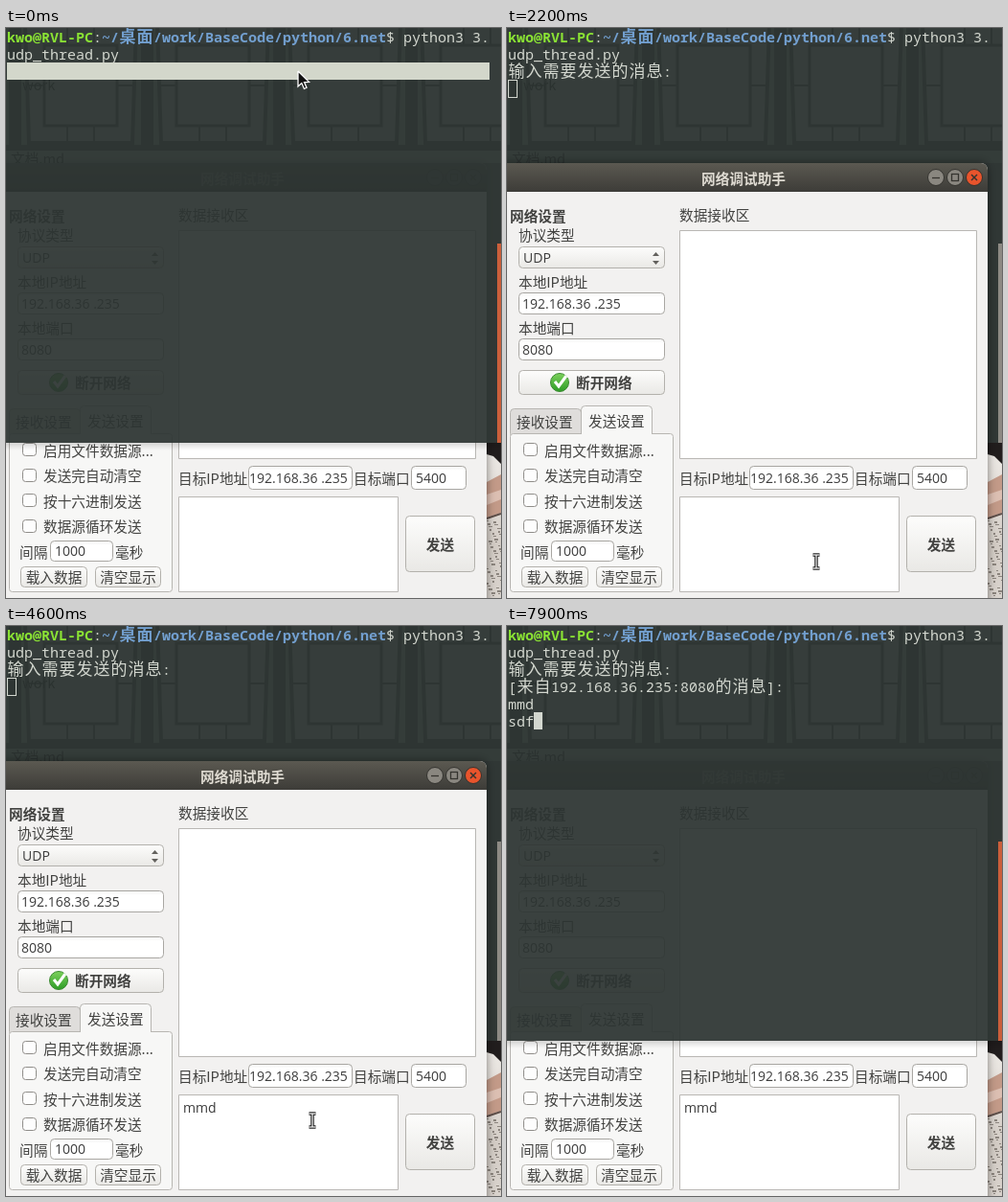
Animation, 517 px wide and 595 px high, one loop 8000 ms. Source, as an HTML page with a canvas:

```html
<!DOCTYPE html>
<html lang="zh">
<head>
<meta charset="utf-8">
<style>
html, body { margin: 0; width: 517px; height: 595px; overflow: hidden; background: #333a39 }
canvas { display: block }
</style>
</head>
<body>
<canvas id="stage" width="517" height="595"></canvas>
<script>
const c = document.getElementById('stage').getContext('2d');
const LOOP = 8000, TICK = 100, CELL = 9, ROW = 18;
const FG = '#d3d7cf', INK = '#424240';
const CJK = '"Noto Sans CJK SC", "Noto Sans CJK", sans-serif';

function gradient(y0, y1, ...colors) {
  const g = c.createLinearGradient(0, y0, 0, y1);
  colors.forEach((color, i) => g.addColorStop(i / (colors.length - 1), color));
  return g;
}
function rect(x, y, w, h, fill) {
  c.fillStyle = fill;
  c.fillRect(x, y, w, h);
}
function box(x0, y0, x1, y1, r, fill, stroke) {
  c.beginPath();
  c.roundRect(x0 + .5, y0 + .5, x1 - x0 - 1, y1 - y0 - 1, r);
  c.fillStyle = fill;
  c.fill();
  if (stroke) { c.strokeStyle = stroke; c.lineWidth = 1; c.stroke(); }
}
function disc(x, y, r, fill, stroke) {
  box(x - r, y - r, x + r, y + r, r, fill, stroke);
}
function poly(points, fill) {
  c.beginPath();
  points.forEach(([x, y]) => c.lineTo(x, y));
  c.closePath();
  c.fillStyle = fill;
  c.fill();
}
function line(points, color, width) {
  c.beginPath();
  points.forEach(([x, y]) => c.lineTo(x, y));
  c.strokeStyle = color;
  c.lineWidth = width;
  c.stroke();
}
function text(str, x, y, font, color, align = 'left') {
  c.font = font;
  c.fillStyle = color;
  c.textAlign = align;
  c.fillText(str, x, y);
}
// Labels are placed by the middle of their line.
const label = (str, x, y, weight = 400, align, color = INK) =>
  text(str, x, y + 5.5, `${weight} 14.67px ${CJK}`, color, align);
const latin = (str, x, y) =>
  text(str, x, y + 5, '14px "Open Sans", sans-serif', '#3c3c3c');

function entry(x0, y0, x1, y1, str, pad = 4) {
  box(x0, y0, x1, y1, 4, gradient(y0, y0 + 5, '#f1f1f0', '#fff'), '#a9a7a3');
  latin(str, x0 + pad, (y0 + y1) / 2);
}
function button(x0, y0, x1, y1) {
  box(x0, y0, x1, y1, 4, gradient(y0, y1, '#fdfdfc', '#e9e8e5'), '#b3b1ac');
}

function desktop() {
  const wood = '#454e48';
  rect(0, 0, 517, 595, '#62665f');
  rect(0, 0, 517, 141, '#a2aa9f');
  for (let i = 0; i < 4; i++) {
    const x = 20 + i * 138;
    rect(x - 17, 0, 13, 124, wood);
    poly([[x, -4], [x + 116, -4], [x + 112, 120], [x + 4, 120]], '#b6bdb2');
    c.strokeStyle = wood;
    c.lineWidth = 4;
    c.stroke();
    c.lineWidth = 3;
    c.strokeRect(x + 20, 18, 76, 84);
    for (const d of [44, 72]) {
      line([[x + d, 0], [x + d, 18]], wood, 2);
      line([[x + d, 102], [x + d, 120]], wood, 2);
    }
    line([[x, 60], [x + 20, 60]], wood, 2);
    line([[x + 96, 60], [x + 116, 60]], wood, 2);
  }
  rect(0, 122, 517, 6, wood);
  label('work', 17, 59, 400, 'left', '#111');
  label('文档.md', 5, 136, 400, 'left', '#111');

  // Soft stand-in for the photo at the lower right edge.
  rect(502, 433, 15, 162, gradient(433, 595, '#efece8', '#e2ddd7', '#d3ccc5', '#d9d3cd'));
  poly([[502, 433], [517, 433], [517, 455], [509, 447], [502, 445]], '#211d1d');
  poly([[502, 474], [517, 466], [517, 506], [502, 511]], '#c39a88');
  poly([[502, 487], [517, 482], [517, 492], [502, 498]], '#dcbfb2');
  line([[502, 512], [517, 507]], '#5d4d47', 2);
  for (let i = 0; i < 45; i++) {
    rect(502 + i * 7 % 15, 514 + i * 31 % 80, 2 + i % 3, 1 + i % 2, '#8c857e');
  }
}

function appWindow(focused, typed, caretX) {
  c.save();
  c.shadowColor = 'rgba(0,0,0,.45)';
  c.shadowBlur = 10;
  c.beginPath();
  c.roundRect(-10, 141, 512, 480, [0, 7, 0, 0]);
  c.fillStyle = '#f2f1f0';
  c.fill();
  c.restore();
  c.beginPath();
  c.roundRect(-10, 141, 512, 30, [0, 7, 0, 0]);
  c.fillStyle = gradient(141, 171, '#5b5951', '#3d3c38');
  c.fill();
  label('网络调试助手', 247, 157, 700, 'center', focused ? '#dfdbd2' : '#807d78');
  const dim = focused ? '#8a8780' : '#5c5a55';
  disc(448, 156, 9, dim, '#34332f');
  disc(468, 156, 9, dim, '#34332f');
  disc(488, 156, 9, focused ? '#e9542c' : dim, '#34332f');
  line([[444, 156.5], [452, 156.5]], '#35342f', 1.3);
  c.strokeRect(464.5, 152.5, 7, 7);
  line([[485, 153], [491, 159]], '#35342f', 1.5);
  line([[491, 153], [485, 159]], '#35342f', 1.5);

  label('网络设置', 3, 196, 700);
  label('协议类型', 12, 216);
  button(12, 228, 165, 251);
  latin('UDP', 17, 240);
  poly([[152, 238], [159, 238], [155.5, 234]], '#62605c');
  poly([[152, 243], [159, 243], [155.5, 247]], '#62605c');
  label('本地IP地址', 12, 265);
  entry(12, 276, 165, 299, '192.168.36 .235');
  label('本地端口', 12, 313);
  entry(12, 324, 165, 347, '8080');
  button(12, 357, 165, 383);
  disc(55, 370, 10, gradient(360, 380, '#7fd35e', '#2b9a24'), '#3a8a30');
  line([[50, 369], [54, 374], [62, 363]], '#fff', 3);
  label('断开网络', 72, 370, 700);

  box(3, 397, 78, 428, 4, '#dfdddb', '#b8b6b2');
  box(3, 423, 174, 589, 3, '#f7f7f6', '#b8b6b2');
  box(77, 394, 152, 430, 4, '#f7f7f6', '#b8b6b2');
  rect(76, 424, 77, 8, '#f7f7f6');
  label('接收设置', 10, 411);
  label('发送设置', 85, 410);
  ['启用文件数据源...', '发送完自动清空', '按十六进制发送', '数据源循环发送'].forEach((str, i) => {
    const y = Math.round(440 + i * 26.6);
    box(17, y - 7, 32, y + 7, 3, '#fdfdfd', '#8f8d89');
    label(str, 39, Math.round(441 + i * 26.4));
  });
  label('间隔', 14, 547);
  entry(46, 535, 112, 557, '1000', 5);
  label('毫秒', 114, 547);
  button(15, 562, 85, 584);
  label('载入数据', 50, 573, 400, 'center');
  button(93, 562, 162, 584);
  label('清空显示', 127.5, 573, 400, 'center');

  label('数据接收区', 180, 195);
  box(180, 211, 491, 450, 0, '#fff', '#b9b7b4');
  label('目标IP地址', 180, 470);
  entry(253, 457, 362, 482, '192.168.36 .235', 1);
  label('目标端口', 363, 470);
  entry(423, 457, 481, 482, '5400', 5);
  box(180, 489, 410, 589, 0, '#fff', '#b9b7b4');
  latin(typed, 185, 503);
  if (caretX) rect(caretX, 494, 1, 17, '#222');
  button(417, 509, 490, 568);
  label('发送', 453.5, 539, 700, 'center');
}

function print(row, col, str, color = FG, weight = 400) {
  for (const ch of str) {
    const wide = ch > '\u2e80', cells = wide ? 2 : 1;
    const font = wide ? `17px ${CJK}` : '15px "Noto Sans Mono", monospace';
    text(ch, 1 + (col + cells / 2) * CELL, row * ROW + 15, `${weight} ${font}`, color, 'center');
    col += cells;
  }
}

function terminalBack(focused) {
  rect(0, 0, 517, 433, 'rgba(45,52,50,.93)');
  rect(513, 225, 4, 208, focused ? '#cb5f3b' : '#8d8a84');
  if (focused) rect(0, 433, 517, 8, gradient(433, 441, 'rgba(0,0,0,.14)', 'rgba(0,0,0,0)'));
}

function terminalText(t, focused) {
  print(0, 0, 'kwo@RVL-PC', '#8ae234', 700);
  print(0, 10, ':');
  print(0, 11, '~/桌面/work/BaseCode/python/6.net', '#729fcf', 700);
  print(0, 44, '$ python3 3.');
  print(1, 0, 'udp_thread.py');
  if (t < 200) rect(1, 36, 504, 18, '#d3d7cb');
  if (t >= 1500) print(2, 0, '输入需要发送的消息:');
  if (t >= 7000) {
    print(3, 0, '[来自192.168.36.235:8080的消息]:');
    print(4, 0, 'mmd');
  }
  const reply = t >= 7900 ? 'sdf' : t >= 7800 ? 'sd' : '';
  print(5, 0, reply);

  const [row, col] = t < 1500 ? [1, 14] : t < 7000 ? [3, 0] : [5, reply.length];
  const x = 1 + col * CELL, y = row * ROW;
  if (!focused) {
    c.strokeStyle = FG;
    c.lineWidth = 1;
    c.strokeRect(x + .5, y + .5, CELL, ROW);
  } else if (during(t, [400, 900], [1300, 1900], [7600, LOOP])) {
    rect(x, y, CELL, ROW, FG);
  }
}

const during = (t, ...spans) => spans.some(([a, b]) => t >= a && t < b);

// time, x, y
const path = [
  [0, 305, 45], [100, 305, 45], [400, 306, 47], [1200, 306, 47], [1300, 305, 46],
  [1400, 305, 46], [1900, 322, 557], [2100, 322, 557], [2600, 325, 555],
  [3900, 325, 555], [4200, 320, 516], [4900, 320, 516], [5600, 490, 540],
  [5700, 490, 540], [5900, 478, 546], [6900, 478, 546], [7300, 228, 129], [LOOP, 228, 129]
];
function pointerAt(t) {
  const i = path.findIndex(p => p[0] > t);
  const [t0, x0, y0] = path[i - 1], [t1, x1, y1] = path[i];
  const k = (t - t0) / (t1 - t0);
  return [x0 + (x1 - x0) * k, y0 + (y1 - y0) * k];
}

function pointer(t, focused) {
  if (t >= 7800) return;
  const [x, y] = pointerAt(t).map(Math.round);
  const overText = x > 180 && x < 410 && y > 489;
  const overTerminal = t >= 200 && y < (focused ? 433 : 141);
  c.save();
  c.translate(x, y);
  if (overText || overTerminal) {
    const parts = [[[-3.5, -7], [3.5, -7]], [[-3.5, 7], [3.5, 7]], [[0, -7], [0, 7]]];
    for (const part of parts) line(part, '#111', 3.4);
    for (const part of parts) line(part, '#fff', 1.2);
  } else {
    const arrow = [[0, 0], [0, 16], [3.8, 12.6], [6.4, 18.5], [9, 17.3], [6.5, 11.5], [11.5, 11.3]];
    poly(arrow, '#111');
    line([...arrow, [0, 0]], '#fff', 1.3);
  }
  c.restore();
}

function draw(t) {
  const focused = t < 2200 || t >= 7600;
  const typed = 'mmd'.slice(0, t < 3200 ? 0 : t < 3400 ? 1 : t < 3600 ? 2 : 3);
  const caretX = during(t, [3100, 4000]) ? 185
    : during(t, [4000, 4600], [5000, 5600], [6100, 6500], [7000, 7500]) ? 219 : 0;
  desktop();
  if (focused) {
    appWindow(false, typed, 0);
    terminalBack(true);
    terminalText(t, true);
  } else {
    terminalBack(false);
    terminalText(t, false);
    appWindow(true, typed, caretX);
  }
  pointer(t, focused);
}

const start = performance.now();
function frame() {
  const t = (performance.now() - start) % LOOP;
  draw(Math.floor(t / TICK) * TICK);
  requestAnimationFrame(frame);
}
frame();
</script>
</body>
</html>
```
